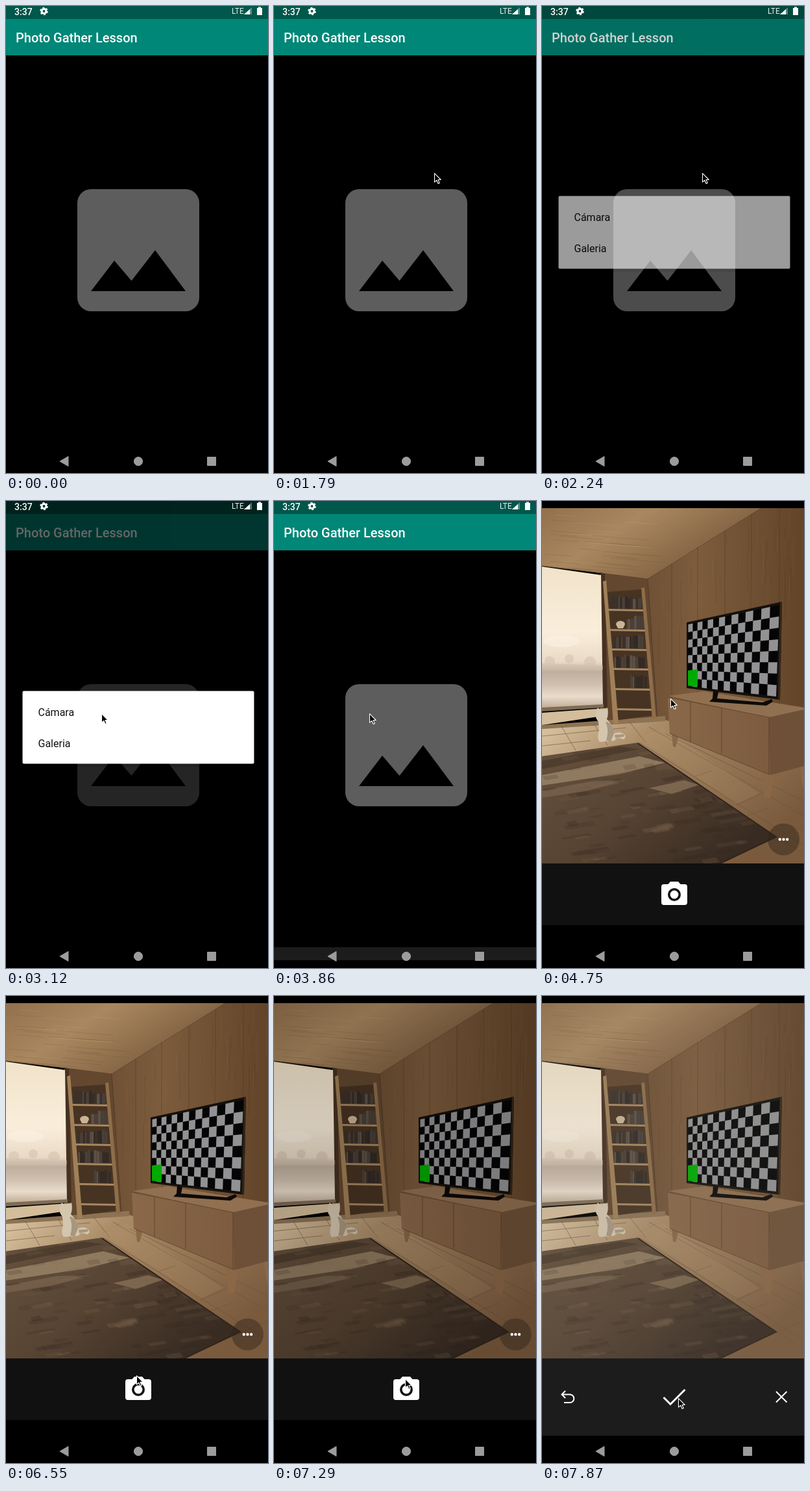
Write an HTML page that moves like this. It is 404 px wide and 719 px high and loops after 8000 ms.

```html
<!DOCTYPE html>
<html lang="es">
<head>
<meta charset="utf-8">
<title>Photo picker</title>
<style>
html, body { margin: 0; width: 100%; height: 100%; overflow: hidden; background: #000; }
svg.stage { display: block; width: 100%; height: 100%; }
text { font-family: Roboto, "Open Sans", sans-serif; }
.medium { font-weight: 500; }
</style>
</head>
<body>
<svg class="stage" viewBox="0 0 404 719" preserveAspectRatio="none">
  <defs>
    <path id="camera" fill-rule="evenodd" d="M9 2 7.2 4H4Q2 4 2 6V18Q2 20 4 20H20Q22 20 22 18V6Q22 4 20 4H16.8L15 2ZM12 7A5 5 0 0 1 12 17 5 5 0 0 1 12 7ZM12 8.8A3.2 3.2 0 0 0 12 15.2 3.2 3.2 0 0 0 12 8.8Z"/>
    <linearGradient id="ceiling" x1="0" y1="0" x2="1" y2=".5">
      <stop stop-color="#91704c"/><stop offset=".4" stop-color="#a98860"/><stop offset="1" stop-color="#765539"/>
    </linearGradient>
    <linearGradient id="wall">
      <stop stop-color="#6d4f34"/><stop offset=".35" stop-color="#7d5c3d"/><stop offset="1" stop-color="#624429"/>
    </linearGradient>
    <linearGradient id="sky" x1="0" y1="0" x2="0" y2="1">
      <stop stop-color="#f1e3c9"/><stop offset=".45" stop-color="#faeedb"/><stop offset=".66" stop-color="#e9dac6"/>
      <stop offset=".73" stop-color="#bfae9d"/><stop offset=".82" stop-color="#d0c0b0"/><stop offset=".9" stop-color="#eadccb"/><stop offset="1" stop-color="#b5a08a"/>
    </linearGradient>
    <linearGradient id="floor" x1="0" y1="0" x2="1" y2=".6">
      <stop stop-color="#dcc7a5"/><stop offset=".35" stop-color="#a98a66"/><stop offset="1" stop-color="#7a5a3d"/>
    </linearGradient>
    <linearGradient id="rug" x1="0" y1="0" x2="1" y2=".6">
      <stop stop-color="#66513d"/><stop offset=".5" stop-color="#574433"/><stop offset="1" stop-color="#382b22"/>
    </linearGradient>
    <linearGradient id="front"><stop stop-color="#8a6849"/><stop offset="1" stop-color="#7c5b3f"/></linearGradient>
    <clipPath id="view"><path d="M0 11H404V558H0Z"/></clipPath>
    <clipPath id="rugClip"><path d="M0 393 148 372 361 517 275 558H0Z"/></clipPath>
  </defs>

  <g id="app">
    <path d="M0 0H404V719H0Z"/>
    <path fill="#00574b" d="M0 0H404V20H0Z"/>
    <path fill="#008777" d="M0 20H404V76H0Z"/>
    <text class="medium" x="15" y="55.5" font-size="20" fill="#fff">Photo Gather Lesson</text>
    <rect x="110" y="282" width="188" height="188" rx="21" fill="#5d5d5d"/>
    <path d="M131 439 167 392 193.500 423 230 376 277 439Z"/>
    <path id="dim" d="M0 0H404V687H0Z"/>
    <g fill="#fff">
      <text class="medium" x="13" y="13.500" font-size="14">3:37</text>
      <circle cx="58.500" cy="8" r="3.400" fill="none" stroke="#fff" stroke-width="3"/>
      <circle cx="58.500" cy="8" r="5.300" fill="none" stroke="#fff" stroke-width="2" stroke-dasharray="2.800 2.750"/>
      <text x="348" y="12" font-size="12" fill="#e4efed">LTE</text>
      <path opacity=".35" d="M379 2V13H367Z"/>
      <path d="M376 5V13H367Z"/>
      <path d="M387 3H389V1.500H393V3H395V14H387Z"/>
    </g>
    <g id="dialog">
      <rect x="24" y="294" width="360" height="115" rx="4" opacity=".12"/>
      <rect x="25.500" y="292.500" width="357" height="112" rx="2" fill="#fff"/>
      <path id="ripple" fill="#000" opacity="0" d="M25.500 301H382.500V349H25.500Z"/>
      <g font-size="16" fill="#111"><text x="49.500" y="330.500">Cámara</text><text x="49.500" y="378.500">Galeria</text></g>
    </g>
  </g>

  <g id="cam">
    <path d="M0 0H404V719H0Z"/>
    <g id="room" clip-path="url(#view)">
      <path fill="url(#wall)" d="M150 11H404V430L163 335Z"/>
      <path fill="#63472f" d="M90 108 163 118 178 340H90Z"/>
      <path fill="url(#ceiling)" d="M0 11H338L163 120 92 111 0 100Z"/>
      <g id="grain" fill="none"></g>
      <path fill="#463121" d="M90 110 97 112 101 322H92Z"/>
      <path fill="url(#sky)" d="M0 101 91 114 94 316 0 323Z"/>
      <g fill="#cdbca8" opacity=".45"><circle cx="12" cy="247" r="8"/><circle cx="42" cy="243" r="7"/><circle cx="74" cy="248" r="9"/><ellipse cx="30" cy="216" rx="28" ry="9" fill="#fff6e8"/><path d="M0 250 94 253V260H0Z"/></g>
      <path fill="#7f6c55" d="M0 318 95 313V318L0 324Z"/>
      <path fill="#d3bd9a" d="M0 326 98 319 100 330 0 345Z"/>
      <path fill="url(#floor)" d="M0 350 100 341 190 337 404 404V558H0Z"/>
      <path fill="#8d7354" d="M0 345 190 331V339L0 351Z"/>
      <g id="planks" stroke="#6d5036" opacity=".6" fill="none"></g>
      <g id="shelf"></g>
      <path fill="#d4c6ae" d="M86 318 90 322 96 321 101 318Q103 328 100 336 109 344 111 358 120 354 127 359 131 364 125 367 115 362 112 369L89 371Q84 366 88 352L87 340Q81 333 83 324Z"/>
      <path fill="#8b7660" opacity=".6" d="M101 340Q110 345 111 358L106 370 99 369Q104 352 98 340ZM112 360 127 359 126 363 113 365Z"/>
      <path fill="url(#rug)" d="M0 393 148 372 361 517 275 558H0Z"/>
      <g clip-path="url(#rugClip)" id="weave"></g>
      <path fill="none" stroke="#30241b" stroke-width="2" d="M148 373 361 517 275 558"/>
      <path fill="#8a6747" d="M200 358 211 361 206 379 202 378ZM337 418 357 421 352 458 343 457ZM397 409 404 408V440L402 439Z"/>
      <path fill="#907050" d="M195 300 250 293 404 318V322L350 334Z"/>
      <path fill="url(#front)" d="M194 302 350 333 352 422 197 358Z"/>
      <path fill="#6e5038" d="M350 333 404 321V408L352 422Z"/>
      <path fill="none" stroke="#51391f" stroke-opacity=".65" d="M229 309V371M277 319V389M194 302 350 333V421L197 358"/>
      <path fill="#0d0a08" d="M264 292 272 294 270 304 340 310 354 305 356 309 346 315 258 309 263 304Z"/>
      <path fill="#15100c" d="M223 187 370 155 367 306 223 288Z"/>
      <path fill="#33261a" d="M367 156 370 155 367 306 364 305Z"/>
      <g id="screen"></g>
      <path fill="#00aa00" d="M225 261 240 259V286L225 284.500Z"/>
    </g>
    <path id="wash" fill="#8c8880" d="M0 11H404V558H0Z"/>
    <path id="flash" fill="#000" d="M0 11H404V558H0Z"/>
    <g id="shoot">
      <circle cx="372.500" cy="521" r="24.500" fill="#30251c" opacity=".45"/>
      <g fill="#fff"><circle cx="366.800" cy="521" r="2.200"/><circle cx="372.500" cy="521" r="2.200"/><circle cx="378.200" cy="521" r="2.200"/></g>
      <path fill="#111" d="M0 558H404V653H0Z"/>
      <use href="#camera" fill="#fff" transform="translate(180 582) scale(2)"/>
    </g>
    <g id="review">
      <path fill="#1c1c1c" d="M0 558H404V677H0Z"/>
      <g fill="none" stroke="#fff" stroke-width="2">
        <path d="M36 608 30.500 613.500 36 619M30.500 613.500H43A6.200 6.200 0 0 1 43 626H34"/>
        <path stroke-width="3" d="M187.500 618 198 628.500 220.500 606"/>
        <path d="M361 609 377.500 625.500M377.500 609 361 625.500"/>
      </g>
    </g>
  </g>

  <path id="cover" fill="#1c1c1c" d="M0 0H404V677H0Z"/>
  <path id="rise" fill="#1c1c1c" d="M0 687H404V707H0Z"/>
  <use id="bigIcon" href="#camera" fill="#fff" transform="translate(172.700 304.700) scale(2.650)"/>
  <g fill="#9c9c9c" stroke="#9c9c9c" stroke-linejoin="round">
    <path d="M83 701 96 693.500V708.500Z"/><circle cx="204" cy="701" r="6.600"/><path d="M310.500 694.500H323.500V707.500H310.500Z"/>
  </g>
  <g id="cursor"><path fill="#000" stroke="#fff" stroke-width="1.100" stroke-linejoin="round" d="M.5 .7V14.200L3.700 11.300 6.100 16.500 8.300 15.500 6 10.500H10.300Z"/></g>
</svg>
<script>
const LOOP = 8000;
const $ = id => document.getElementById(id);

function rng(seed) {
  return () => (seed = (seed * 16807) % 2147483647) / 2147483647;
}
function add(parent, d, attrs) {
  const p = document.createElementNS("http://www.w3.org/2000/svg", "path");
  p.setAttribute("d", d);
  for (const k in attrs) p.setAttribute(k, attrs[k]);
  $(parent).append(p);
}
const quad = pts => "M" + pts.map(p => p.map(n => n.toFixed(2)).join(" ")).join("L") + "Z";
const mix = (a, b, t) => a + (b - a) * t;

// Television test pattern, in perspective
function drawScreen() {
  const cols = 14, rows = 8;
  const at = (i, j) => {
    const u = i / cols, t = u * 96 / (u * 96 + (1 - u) * 141), v = j / rows;
    return [mix(mix(225.5, 366, t), mix(225, 361, t), v),
            mix(mix(190, 160, t), mix(285, 301, t), v)];
  };
  add("screen", quad([at(0, 0), at(cols, 0), at(cols, rows), at(0, rows)]), { fill: "#050505" });
  for (let i = 0; i < cols; i++)
    for (let j = 0; j < rows; j++)
      if ((i + j) % 2 === 0)
        add("screen", quad([at(i, j), at(i + 1, j), at(i + 1, j + 1), at(i, j + 1)]), { fill: "#929294" });
}

// Leaning bookcase with rows of books
function drawShelf() {
  const rand = rng(41);
  const left = y => mix(98, 114, (y - 122) / 221), right = y => mix(155, 173, (y - 133) / 202);
  add("shelf", "M100 140 156 136 172 330 113 338Z", { fill: "#473322" });
  [166, 197, 227, 257, 288, 319].forEach((y, row) => {
    const tones = ["#312a25", "#49403a", "#5d5147", "#3b312a"];
    let x = left(y) + 4;
    const end = right(y) - (row === 1 ? 6 : 9);
    if (row === 1) x += 24;
    if (row === 4) x += 22;
    while (row < 5 && x < end) {
      const w = 2 + rand() * 3, h = 15 + rand() * 6;
      add("shelf", `M${x} ${y}v${-h}h${w}v${h}Z`, { fill: tones[Math.floor(rand() * 4)] });
      x += w + .4;
    }
    add("shelf", `M${left(y)} ${y}L${right(y)} ${y + 1}V${y + 4}L${left(y)} ${y + 3}Z`, { fill: "#a88862" });
  });
  add("shelf", "M114 190a7 5.500 0 0 1 14 0l-3 6h-8Z", { fill: "#c9b596" });
  add("shelf", "M94 124 99 122 118 342 110 343Z", { fill: "#a08058" });
  add("shelf", "M153 134 158 133 176 335 170 336Z", { fill: "#8e6d49" });
}

function drawWood() {
  const rand = rng(7);
  [[200, 96], [240, 71], [282, 45], [323, 20], [366, 11]].forEach(([x, y]) =>
    add("grain", `M${x} ${y}V330`, { stroke: "#4a321f", "stroke-opacity": .45 }));
  for (let i = 0; i < 45; i++) {
    const x = 168 + rand() * 234, y = Math.max(14, 120 - (x - 163) * .62) + rand() * 110;
    add("grain", `M${x} ${y}v${15 + rand() * 60}`, { stroke: rand() < .5 ? "#94704b" : "#523821", "stroke-opacity": .2 });
  }
  for (let i = 0; i < 34; i++) {
    const y = 14 + rand() * 90, x = rand() * Math.max(20, 230 - y * 1.3), w = 25 + rand() * 65;
    add("grain", `M${x} ${y}l${w} ${w * .08}`, { stroke: rand() < .5 ? "#bf9d72" : "#775738", "stroke-opacity": .28 });
  }
  add("grain", "M0 100 92 111 163 120 338 11", { stroke: "#5b4029", "stroke-opacity": .7 });
  add("grain", "M163 120 178 335", { stroke: "#4b3423", "stroke-opacity": .7 });
  add("planks", "M0 362 130 349M0 377 75 369M30 347 52 384M80 343 101 376M135 340 160 372M150 372 404 530M165 348 404 485M190 358 404 462M292 549 404 500M236 424 262 415M300 468 340 450M315 485 347 473M362 517 404 543", {});
  add("planks", "M150 366 185 349 335 450 300 466Z", { fill: "#c4a57d", opacity: .2, stroke: "none" });
}

function drawRug() {
  const rand = rng(93);
  add("weave", "M0 422 150 393 190 403 120 420 0 438Z", { fill: "#a08a6c", opacity: .75 });
  add("weave", "M0 446 80 431 130 430 70 446 0 457Z", { fill: "#86705a", opacity: .5 });
  add("weave", "M165 442 220 430 242 437 200 451Z", { fill: "#a48c6c", opacity: .5 });
  add("weave", "M0 400 120 378 150 382 0 413Z", { fill: "#433427", opacity: .6 });
  for (let i = 0; i < 110; i++) {
    const x = rand() * 330, y = 385 + rand() * 170, w = 12 + rand() * 34, h = 2 + rand() * 5;
    add("weave", `M${x} ${y}l${w} ${-w * .17} 5 ${h} ${-w} ${w * .17}Z`,
      { fill: rand() < .5 ? "#836a50" : "#33271e", opacity: .1 + rand() * .2 });
  }
}

drawScreen();
drawShelf();
drawWood();
drawRug();

// Each step is [time, value]; values hold until the next step
function hold(id, prop, steps) {
  const frames = steps.map(([t, v]) => ({ offset: t / LOOP, [prop]: v, easing: "steps(1, end)" }));
  frames.push({ offset: 1, [prop]: steps[steps.length - 1][1] });
  $(id).animate(frames, { duration: LOOP, iterations: Infinity });
}
const fade = (id, ...steps) => hold(id, "opacity", steps);

fade("dim", [0, 0], [2240, .18], [2380, .6], [3710, .25], [3860, 0]);
fade("dialog", [0, 0], [2240, .61], [2380, 1], [3710, .4], [3860, 0]);
fade("ripple", [0, 0], [3560, .12]);
fade("rise", [0, 0], [3860, 1], [4000, 0]);
fade("cover", [0, 0], [4000, .8], [4150, 1], [4460, .78], [4600, .1], [4750, 0]);
fade("bigIcon", [0, 0], [4150, .3], [4300, .6], [4460, .36], [4600, .08], [4750, 0]);
fade("cam", [0, 0], [4150, 1]);
fade("flash", [0, 0], [7000, .45], [7150, .15], [7300, 0]);
fade("shoot", [0, 1], [7300, 0]);
fade("review", [0, 0], [7300, .6], [7440, 1]);
fade("wash", [0, 0], [7300, .06], [7440, .12]);
fade("cursor", [0, 0], [450, 1]);

const path = [
  [0, 238, 251], [1790, 247, 257],
  [2670, 230, 268], [2820, 192, 295], [2970, 158, 319], [3120, 147, 327],
  [4000, 160, 312], [4150, 180, 288], [4300, 195, 268], [4460, 200, 260], [4600, 200, 277],
  [4750, 198, 304], [4900, 198, 400], [5050, 197, 500], [5200, 197, 552],
  [5500, 198, 571], [5650, 198, 583], [6550, 201, 584], [6700, 202, 589],
  [7440, 204, 599], [7590, 208, 612], [7740, 210, 619]
];
hold("cursor", "transform", path.map(([t, x, y]) => [t, `translate(${x}px, ${y}px)`]));
</script>
</body>
</html>
```
